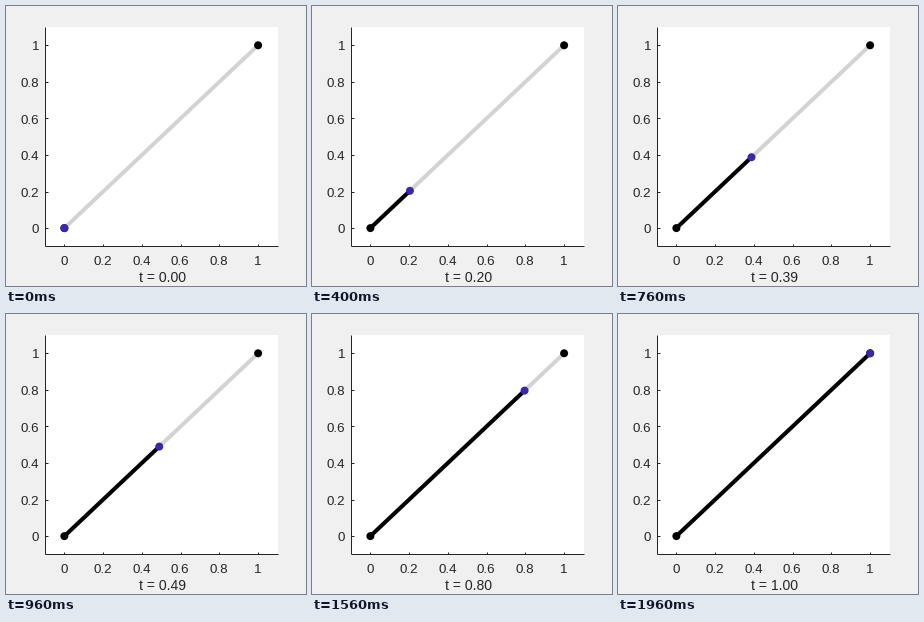
Recreate the animation shown at these times as a matplotlib script. Size 300x280 px, loop 2000 ms.

```python
import matplotlib.pyplot as plt
from matplotlib.animation import FuncAnimation

W, H, DPI = 300, 280, 100
FRAMES, INTERVAL = 50, 40
PT = 72 / DPI  # points per pixel

LEFT, RIGHT, TOP, BOTTOM = 39.0, 271.5, 21.0, 240.4
INK, BLUE, TRACK = "#262626", "#3e26a8", "#d3d3d3"
TICKS = [0, 0.2, 0.4, 0.6, 0.8, 1]

plt.rcParams["font.family"] = "Liberation Sans"
fig = plt.figure(figsize=(W / DPI, H / DPI), dpi=DPI, facecolor="#f0f0f0")
ax = fig.add_axes([0, 0, 1, 1])
ax.set_xlim(0, W)
ax.set_ylim(H, 0)
ax.axis("off")


def px(v):
    return LEFT + (v + 0.1) / 1.2 * (RIGHT - LEFT)


def py(v):
    return BOTTOM - (v + 0.1) / 1.2 * (BOTTOM - TOP)


def line(x, y, color, width, z):
    return ax.plot(x, y, color=color, lw=width * PT, zorder=z,
                   solid_capstyle="butt")[0]


def dot(v, color, z):
    return ax.add_patch(plt.Circle((px(v), py(v)), 4, fc=color, ec="none",
                                   zorder=z))


def label(x, y, s, size, ha):
    return ax.text(x, y, s, fontsize=size * PT, color=INK, ha=ha,
                   va="baseline")


# Plot box, axes and ticks
ax.add_patch(plt.Rectangle((LEFT, TOP), RIGHT - LEFT, BOTTOM - TOP,
                           fc="white", ec="none", zorder=0))
line([LEFT, RIGHT], [BOTTOM, BOTTOM], INK, 1, 1)
line([LEFT, LEFT], [BOTTOM, TOP], INK, 1, 1)
for v in TICKS:
    x, y = px(v), py(v)
    line([x, x], [BOTTOM, BOTTOM - 2.5], INK, 1, 1)
    line([LEFT, LEFT + 2.5], [y, y], INK, 1, 1)
    label(x - 0.4, 259, f"{v:g}", 13.33, "center")
    label(33, y + 5.1, f"{v:g}", 13.33, "right")

# Track, growing segment and points
line([px(0), px(1)], [py(0), py(1)], TRACK, 4, 2)
path = line([], [], "black", 4, 3)
dot(0, "black", 4)
dot(1, "black", 4)
mover = dot(0, BLUE, 5)
caption = label(133, 276, "", 14, "left")


def update(i):
    t = i / (FRAMES - 1)
    path.set_data([px(0), px(t)], [py(0), py(t)])
    mover.center = px(t), py(t)
    caption.set_text(f"t = {t:.2f}")
    return path, mover, caption


anim = FuncAnimation(fig, update, frames=FRAMES, interval=INTERVAL,
                     repeat=True, repeat_delay=0)
plt.show()
```
